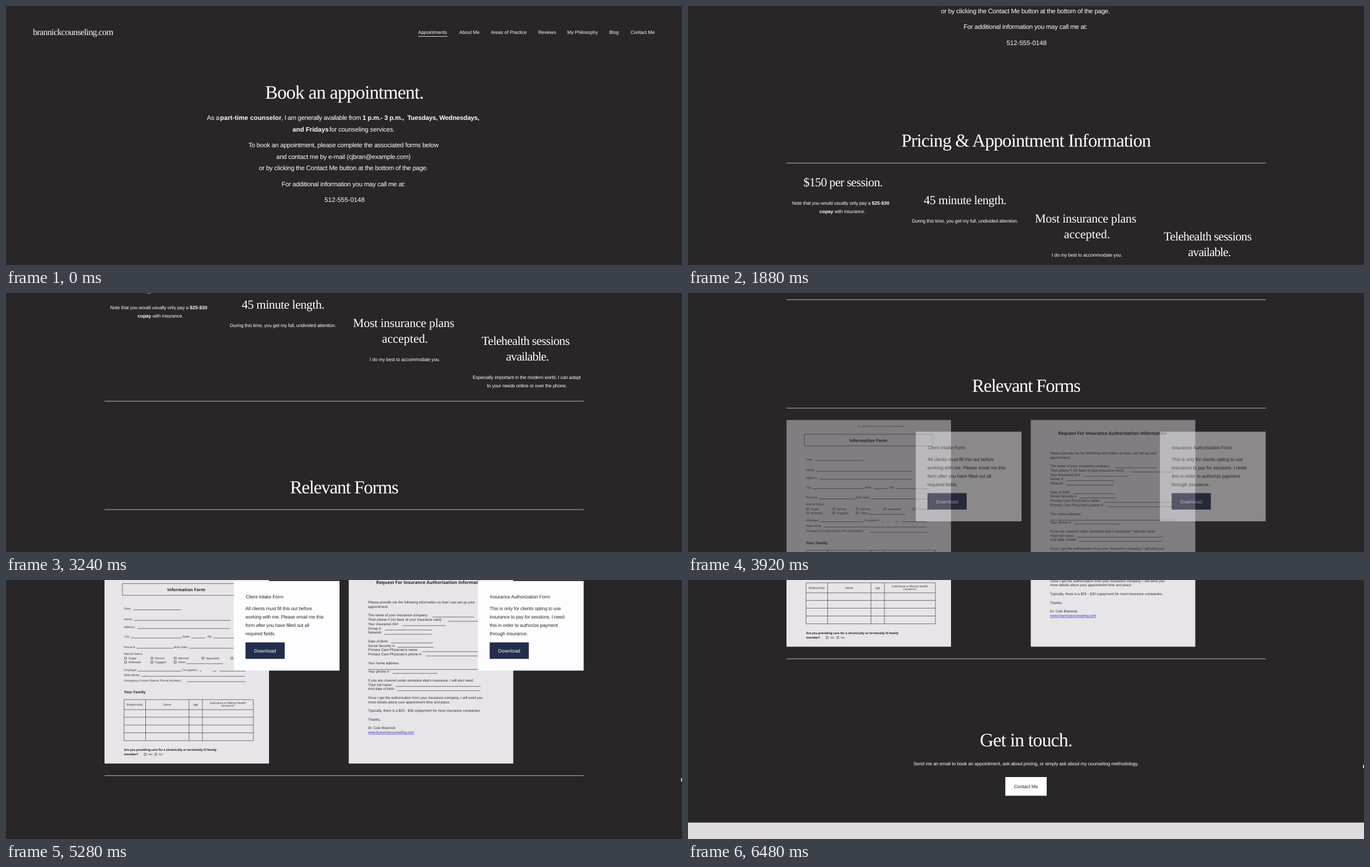
These frames come from a looping animation (1208 by 464 pixels, 6.52 s). An HTML page:

```html
<!DOCTYPE html>
<html lang="en">
<head>
<meta charset="utf-8">
<title>Book an appointment</title>
<style>
  html, body { margin: 0; width: 100%; height: 100%; overflow: hidden; background: #282627; }
  svg { display: block; width: 100vw; height: 100vh; }
  text { text-rendering: geometricPrecision; white-space: pre; }
  .serif { font-family: "Liberation Serif", serif; fill: #fff; }
  .sans { font-family: "Liberation Sans", Arial, sans-serif; fill: #fff; }
  .note { font-size: 8.5px; letter-spacing: -.13px; }
  .body { font-size: 11.5px; letter-spacing: -.24px; }
  .nav { font-size: 8.5px; letter-spacing: -.04px; }
  .card { font-size: 8.5px; letter-spacing: -.13px; fill: #29282b; }
  .intake { font-family: "Open Sans", "Noto Sans", sans-serif; font-size: 5px; fill: #242326; }
  .letter { font-family: "Liberation Sans", Arial, sans-serif; font-size: 6.3px; fill: #2b2a2d; }
  .title { font-family: "Open Sans", "Noto Sans", sans-serif; font-weight: 700; fill: #1f1e21; }
  .b { font-weight: 700; letter-spacing: 0; }
  .mid { text-anchor: middle; }
  .link { fill: #3a2fb5; text-decoration: underline; }
  .ink { stroke: #3a393c; stroke-width: .7; fill: none; }
</style>
</head>
<body>
<svg viewBox="0 0 1208 464" preserveAspectRatio="none" xmlns="http://www.w3.org/2000/svg">
  <g id="page"></g>
  <rect id="pointer" x="1206.5" width="1.5" height="6" fill="#fff"/>
</svg>
<script>
const LOOP = 6520, STEP = 40;
const FORMS_Y = 958;

const text = (cls, x, y, str, style = "") =>
  `<text class="${cls}" x="${x}" y="${y}" style="${style}">${str}</text>`;
const rect = (x, y, w, h, fill) =>
  `<rect x="${x}" y="${y}" width="${w}" height="${h}" fill="${fill}"/>`;
const path = d => `<path class="ink" d="${d}"/>`;
const blank = (x1, x2, y) => path(`M${x1} ${y}H${x2}`);
const heading = (x, y, size, gap, str) =>
  text("serif mid", x, y, str, `font-size:${size}px;letter-spacing:${gap}px`);
const rule = y => rect(176, y - .5, 856.5, 1, "#bdbcbd");
const bold = (str, x, gap = 0) =>
  `<tspan class="b" ${x ? `x="${x}"` : ""} style="letter-spacing:${gap}px">${str}</tspan>`;

function header() {
  const nav = [[736.5, "Appointments"], [810, "About Me"], [866.5, "Areas of Practice"],
    [951, "Reviews"], [1003, "My Philosophy"], [1078, "Blog"], [1116, "Contact Me"]];
  return text("serif", 48, 52, "brannickcounseling.com", "font-size:16px;letter-spacing:-.62px") +
    nav.map(([x, label]) => text("sans nav", x, 50, label)).join("") +
    rect(736.5, 54, 52.5, 1, "#d8d8d8");
}

function booking() {
  const lines = [
    [253, "To book an appointment, please complete the associated forms below"],
    [273.5, "and contact me by e-mail (cjbran@example.com)"],
    [294, "or by clicking the Contact Me button at the bottom of the page."],
    [322.5, "For additional information you may call me at:"]
  ];
  return heading(604.5, 166, 34, -.9, "Book an appointment.") +
    text("sans body", 359, 204, "As a " + bold("part-time counselor", 382.5, .13) +
      `<tspan x="492" style="letter-spacing:-.37px">, I am generally available from</tspan>` +
      bold("1 p.m.- 3 p.m.,\u00a0 Tuesdays, Wednesdays,", 637, -.16)) +
    text("sans body", 512, 224.5, bold("and Fridays") +
      `<tspan x="578" style="letter-spacing:-.15px">for counseling services.</tspan>`) +
    lines.map(([y, s]) => text("sans body mid", 603, y, s)).join("") +
    text("sans body mid", 605, 351, "512-555-0148", "letter-spacing:0");
}

function pricing() {
  const note = (x, y, s) => text("sans note mid", x, y, s);
  return heading(604, 533.5, 33, -.92, "Pricing &amp; Appointment Information") +
    rule(562.5) +
    heading(277, 604, 22, -.63, "$150 per session.") +
    text("sans note", 186, 637, "Note that you would usually only pay a " + bold("$25-$30", 328.5)) +
    text("sans note", 235, 652, bold("copay") + " with insurance.") +
    heading(495, 636.5, 22, -.41, "45 minute length.") +
    note(495, 669.5, "During this time, you get my full, undivided attention.") +
    heading(710.5, 669, 22, -.31, "Most insurance plans") +
    heading(713, 697, 22, 0, "accepted.") +
    note(713, 730, "I do my best to accommodate you.") +
    heading(928.5, 701.5, 22, -.64, "Telehealth sessions") +
    heading(931.5, 729.5, 22, -.88, "available.") +
    note(930.5, 762.5, "Especially important in the modern world, I can adapt") +
    note(931, 777.5, "to your needs online or over the phone.") +
    rule(802);
}

function intakeForm() {
  const label = (x, y, s) => text("intake", x, y, s);
  const field = (x, y, s, x1, x2) => label(x, y, s) + blank(x1, x2, y + .6);
  const box = (x, y, s) =>
    `<rect class="ink" x="${x}" y="${y - 3.7}" width="3.6" height="3.6"/>` + label(x + 7, y, s);
  const cell = (x, y, s) => text("intake mid", x, y, s);
  const rows = [293, 311, 324.5, 338.5, 352.5, 366.5];
  const cols = [211, 249.5, 327, 351, 442];
  return rect(176, 59.5, 294, 348, "#e7e5e8") +
    text("intake mid", 345, 71.5, "Dr. Cole Brannick, Ph.D., LPC • Brannick Counseling", "font-size:3.5px") +
    `<rect class="ink" x="208" y="85" width="229" height="21"/>` +
    text("title mid", 322, 98.8, "Information Form", "font-size:7.6px") +
    field(211, 131.5, "Date:", 227, 313) +
    field(211, 150.5, "Name:", 229, 401) +
    field(211, 165, "Address:", 235, 400) +
    field(211, 182, "City:", 223, 314) +
    field(315.5, 182, "State:", 331, 356) +
    field(360, 182, "Zip:", 371, 432) +
    field(211, 200.3, "Phone #", 233, 299) +
    field(300, 200.3, "Birth Date:", 327, 430) +
    label(211, 212.3, "Marital Status:") +
    ["Single", "Partner", "Married", "Separated", "Divorced"]
      .map((s, i) => box([212, 259, 300.5, 350, 402][i], 220.7, s)).join("") +
    ["Widowed", "Engaged", "Other"]
      .map((s, i) => box([212, 259, 300.5][i], 228, s)).join("") +
    blank(322, 388, 228.6) +
    field(211, 241.3, "Employer:", 235, 314) +
    field(315, 241.3, "Occupation:", 346, 349) +
    blank(370, 376, 241.9) + blank(382, 428, 241.9) +
    field(211, 250.6, "Referred by:", 242, 427) +
    field(211, 260.3, "Emergency Contact (Name, Phone Number):", 324, 428) +
    text("title", 211, 281.5, "Your Family", "font-size:6.5px") +
    path(rows.map(y => `M211 ${y}H442`).join("") + cols.map(x => `M${x} 293V366.5`).join("")) +
    cell(230, 303.5, "Relationship") + cell(288, 303.5, "Name") + cell(339, 303.5, "Age") +
    cell(396.5, 300.8, "Substance or Mental Health") + cell(396.5, 305.6, "Concerns?") +
    text("title", 211, 385, "Are you providing care for a chronically or terminally ill family", "font-size:5.35px") +
    text("title", 211, 393, "member?", "font-size:5.35px") +
    box(247, 393, "Yes") + box(266, 393, "No");
}

function insuranceForm() {
  const line = (y, s) => text("letter", 647, y, s);
  const field = (y, s, x1, x2) => line(y, s) + blank(x1, x2, y + .8);
  return rect(612.5, 59.5, 294, 348, "#e7e5e8") +
    text("title", 661.5, 86, "Request For Insurance Authorization Information", "font-size:7.9px") +
    line(121, "Please provide me the following information so that I can set up your") +
    line(128.6, "appointment.") +
    field(144.2, "The name of your insurance company:", 762, 836) +
    field(151.9, "Their phone # (on back of your insurance card):", 790, 869) +
    field(159.6, "Your insurance ID#:", 708, 786) +
    field(167.4, "Group #:", 677, 761) +
    field(175.2, "Network:", 676, 761) +
    field(190.6, "Date of Birth:", 688, 763) +
    field(198.4, "Social Security #:", 700, 764) +
    field(206.2, "Primary Care Physician's name:", 744, 868) +
    field(214, "Primary Care Physician's phone #:", 751, 868) +
    line(229.5, "Your home address:") + blank(647, 868, 239) +
    field(245.2, "Your phone #:", 690, 771) +
    line(260.7, "If you are covered under someone else's insurance, I will also need") +
    field(268.5, "Their full name:", 696, 848) +
    field(276.2, "And date of birth:", 699, 848) +
    line(291.7, "Once I get the authorization from your insurance company, I will send you") +
    line(299.4, "more details about your appointment time and place.") +
    line(315, "Typically, there is a $25 - $30 copayment for most insurance companies.") +
    line(330.5, "Thanks,") +
    line(346, "Dr. Cole Brannick") +
    text("letter link", 647, 354, "www.brannickcounseling.com");
}

function card(x, title, lines) {
  return rect(x, 80.5, 189, 160.5, "#fdfcfe") +
    text("sans card", x + 21.5, 112, title) +
    lines.map((s, i) => text("sans card", x + 21, 133 + i * 14.9, s)).join("") +
    rect(x + 21, 190.5, 70, 29.5, "#232e4e") +
    text("sans mid", x + 56, 208.5, "Download", "font-size:8.7px;letter-spacing:.1px");
}

function forms() {
  const fade = s => `<g class="fade">${s}</g>`;
  return heading(604, 967, 33, -1.2, "Relevant Forms") + rule(996.2) +
    `<g transform="translate(0 ${FORMS_Y})">` +
    fade(intakeForm()) + fade(insuranceForm()) +
    fade(card(407, "Client Intake Form", ["All clients must fill this out before",
      "working with me. Please email me this", "form after you have filled out all", "required fields."])) +
    fade(card(843.3, "Insurance Authorization Form", ["This is only for clients opting to use",
      "insurance to pay for sessions. I need", "this in order to authorize payment", "through insurance."])) +
    `</g>` + rule(1387.2);
}

function contact() {
  return heading(604, 1544, 34, -.88, "Get in touch.") +
    text("sans note mid", 604, 1578, "Send me an email to book an appointment, ask about pricing, " +
      "or simply ask about my counseling methodology.") +
    rect(567, 1599, 74, 33.5, "#fff") +
    text("sans nav mid", 604, 1619, "Contact Me", "fill:#222") +
    rect(0, 1680.5, 1208, 40, "#dedddb");
}

const page = document.getElementById("page");
const pointer = document.getElementById("pointer");
page.innerHTML = header() + booking() + pricing() + forms() + contact();
const fades = [...page.querySelectorAll(".fade")];

// Monotone cubic curve through [time, value] points, coming to rest at the end.
function curve(points) {
  const slope = points.slice(1).map(([t, v], i) => (v - points[i][1]) / (t - points[i][0]));
  const tangent = points.map((_, i) => {
    if (i === 0) return slope[0];
    if (i === points.length - 1) return 0;
    const a = slope[i - 1], b = slope[i];
    return a * b > 0 ? 2 * a * b / (a + b) : 0;
  });
  return t => {
    let i = 0;
    while (i < points.length - 2 && t > points[i + 1][0]) i++;
    const [t0, v0] = points[i], [t1, v1] = points[i + 1];
    const h = t1 - t0, u = Math.min(1, Math.max(0, (t - t0) / h)), w = 1 - u;
    return w * w * (1 + 2 * u) * v0 + u * u * (3 - 2 * u) * v1 +
      h * u * w * (w * tangent[i] - u * tangent[i + 1]);
  };
}

const scrollAt = curve([[0, 0], [1160, 147.6], [2600, 441], [3920, 790],
  [4680, 958], [5280, 1036.7], [6120, 1235], [6480, 1246]]);
const pointerAt = curve([[4120, 335], [4680, 335], [5280, 355], [6480, 331]]);

function draw(time) {
  const t = Math.floor((time % LOOP) / STEP) * STEP;
  page.setAttribute("transform", `translate(0 ${-scrollAt(t).toFixed(2)})`);
  const shown = Math.min(1, Math.max(0, (t - 3600) / 690));
  fades.forEach(g => g.setAttribute("opacity", shown));
  pointer.setAttribute("y", pointerAt(t));
  pointer.setAttribute("opacity", t >= 4120 ? 1 : 0);
}

const start = performance.now();
function tick() {
  draw(performance.now() - start);
  requestAnimationFrame(tick);
}
tick();
</script>
</body>
</html>
```
